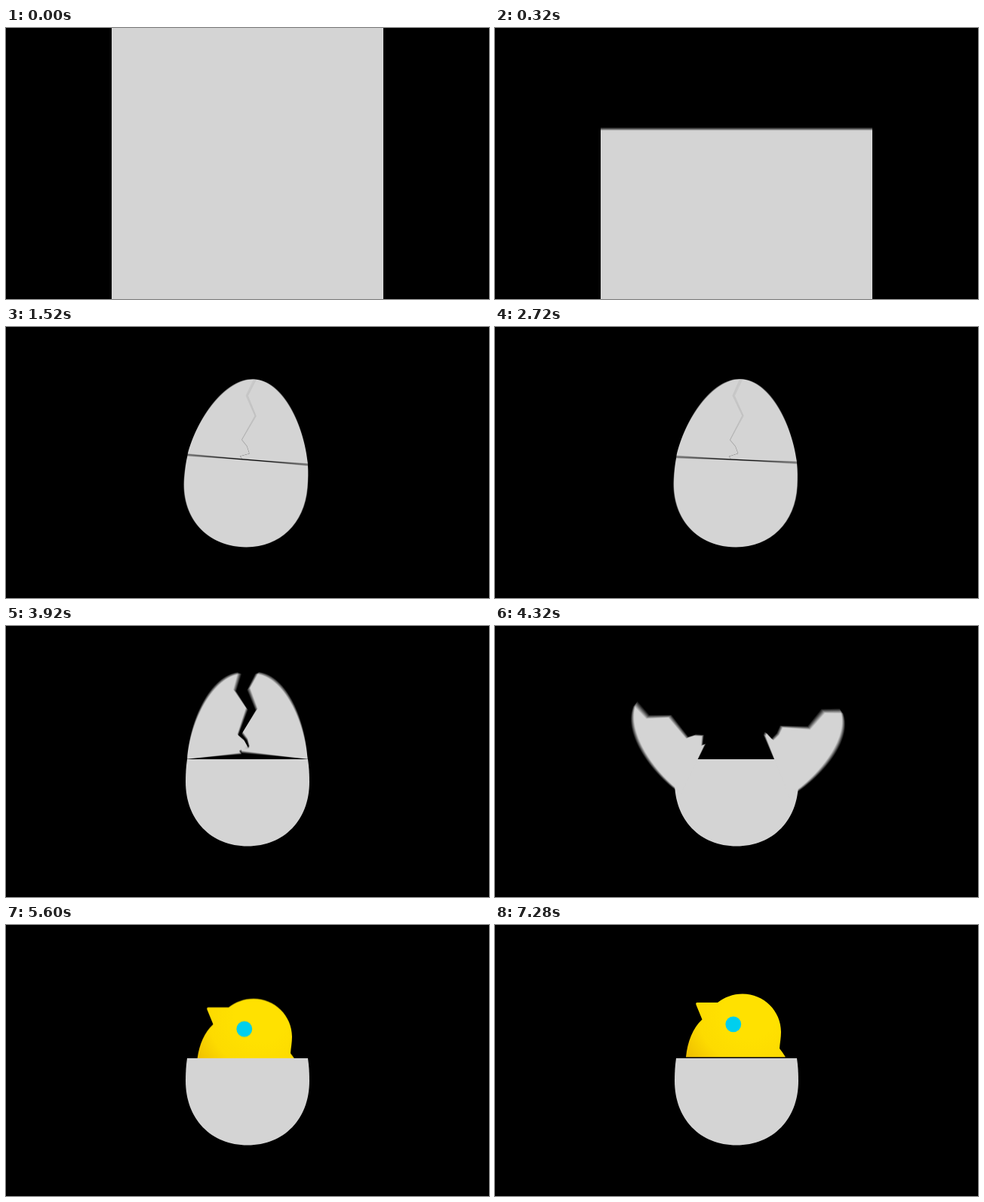
Recreate the animation shown at these times as an HTML page with a canvas. Size 640 by 360 pixels, loop 7.36 s.

```html
<!DOCTYPE html>
<html lang="en">
<head>
<meta charset="utf-8">
<title>Hatching egg</title>
<style>
  html, body { margin: 0; width: 100%; height: 100%; overflow: hidden; background: #000; }
  canvas { display: block; width: 640px; height: 360px; }
</style>
</head>
<body>
<canvas id="stage" width="640" height="360"></canvas>
<script>
const W = 640, H = 360, LOOP = 7360, STEP = 80;
const SHUTTER = 20, SAMPLES = 10;
const SHELL = '#d4d4d4';

const stage = document.getElementById('stage').getContext('2d');
const buffer = document.createElement('canvas');
buffer.width = W;
buffer.height = H;
const ctx = buffer.getContext('2d');

const bowl = new Path2D('M240 177C238.6 186 238 196 238 207C238 258 272 292.5 320 292.5' +
  'C368 292.5 402 258 402 207C402 196 401.4 186 400 177Z');
const crack = 'L312 91.5L325.5 117.5L310 150.5L317.5 158.5L321.5 168L309.5 172.5L312.5 175.7Z';
const leftCap = new Path2D('M240 175.7C249 125 283 69 321 69' + crack);
const rightCap = new Path2D('M400 175.7C391 125 359 69 321 69' + crack);
const chick = new Path2D('M253 175.5C255 155 262 137 274.5 125.5L266.5 106Q265.5 103 268 103' +
  'L295 103C304 96 315 91.5 328 91.5C356 91.5 379 114 379 142' +
  'C379 150 377.5 157 377 164Q381 169 385 175.5Z');

const plumage = ctx.createRadialGradient(338, 115, 35, 338, 115, 105);
plumage.addColorStop(0, '#ffe100');
plumage.addColorStop(0.5, '#fddb00');
plumage.addColorStop(1, '#eebd00');

const progress = (t, from, to) => Math.min(1, Math.max(0, (t - from) / (to - from)));
const smooth = u => u * u * (3 - 2 * u);
const cubicInOut = u => u < 0.5 ? 4 * u ** 3 : 1 - 4 * (1 - u) ** 3;

function zoom(t) {
  return 1 + 64 * (1 - progress(t, 0, 1160)) ** 4.65;
}

// Right, left and back to upright.
function wobble(t, start) {
  const ease = (a, b) => smooth(progress(t, start + a, start + b));
  return 9 * (ease(0, 110) - 2 * ease(110, 330) + ease(330, 440));
}

function drawCap(t, path, hingeX, dx, dy, degrees) {
  const u = progress(t, 3880, 4640), fall = u ** 1.6;
  ctx.save();
  ctx.globalAlpha = progress(t, 1040, 1200) * (1 - progress(t, 4740, 5580));
  ctx.translate(hingeX + dx * fall, 176 + dy * fall);
  ctx.rotate(degrees * u * Math.PI / 180);
  ctx.translate(-hingeX, -176);
  ctx.fillStyle = SHELL;
  ctx.fill(path);
  ctx.restore();
}

function drawChick(t) {
  if (t < 4800) return;
  ctx.save();
  ctx.beginPath();
  ctx.rect(140, 0, 360, 177);
  ctx.clip();
  ctx.translate(0, 100 * (1 - cubicInOut(progress(t, 4920, 5829))));
  ctx.fillStyle = plumage;
  ctx.fill(chick);
  ctx.fillStyle = '#00cfee';
  ctx.beginPath();
  ctx.arc(315.8, 131.8, 10.4, 0, 2 * Math.PI);
  ctx.fill();
  ctx.restore();
}

function drawScene(t) {
  ctx.fillStyle = '#000';
  ctx.fillRect(0, 0, W, H);
  ctx.save();
  ctx.beginPath();
  ctx.rect(140, 0, 360, H);
  ctx.clip();

  const s = zoom(t), angle = wobble(t, 1340) + wobble(t, 2680);
  ctx.translate(320, 180);
  ctx.scale(s, s);
  ctx.rotate(angle * Math.PI / 180);
  ctx.translate(-320, -180);

  drawChick(t);
  ctx.fillStyle = SHELL;
  ctx.fill(bowl);
  drawCap(t, leftCap, 240, 17, 111, -110.7);
  drawCap(t, rightCap, 400, -24, 121, 116.9);
  ctx.restore();
}

const moves = [[1, 1160], [1340, 1790], [2680, 3119], [3880, 4639], [4920, 5835]];
const isMoving = t => moves.some(([a, b]) => t >= a && t <= b);

// Averages several moments around t for motion blur.
function render(t) {
  const n = isMoving(t) ? SAMPLES : 1;
  for (let i = 0; i < n; i++) {
    drawScene(t + ((i + 0.5) / n - 0.5) * SHUTTER);
    stage.globalAlpha = 1 / (i + 1);
    stage.drawImage(buffer, 0, 0);
  }
}

let start = null, shown = -1;
function tick(now) {
  if (start === null) start = now;
  const t = Math.floor(((now - start) % LOOP) / STEP) * STEP;
  if (t !== shown) {
    render(t);
    shown = t;
  }
  requestAnimationFrame(tick);
}
render(0);
requestAnimationFrame(tick);
</script>
</body>
</html>
```
